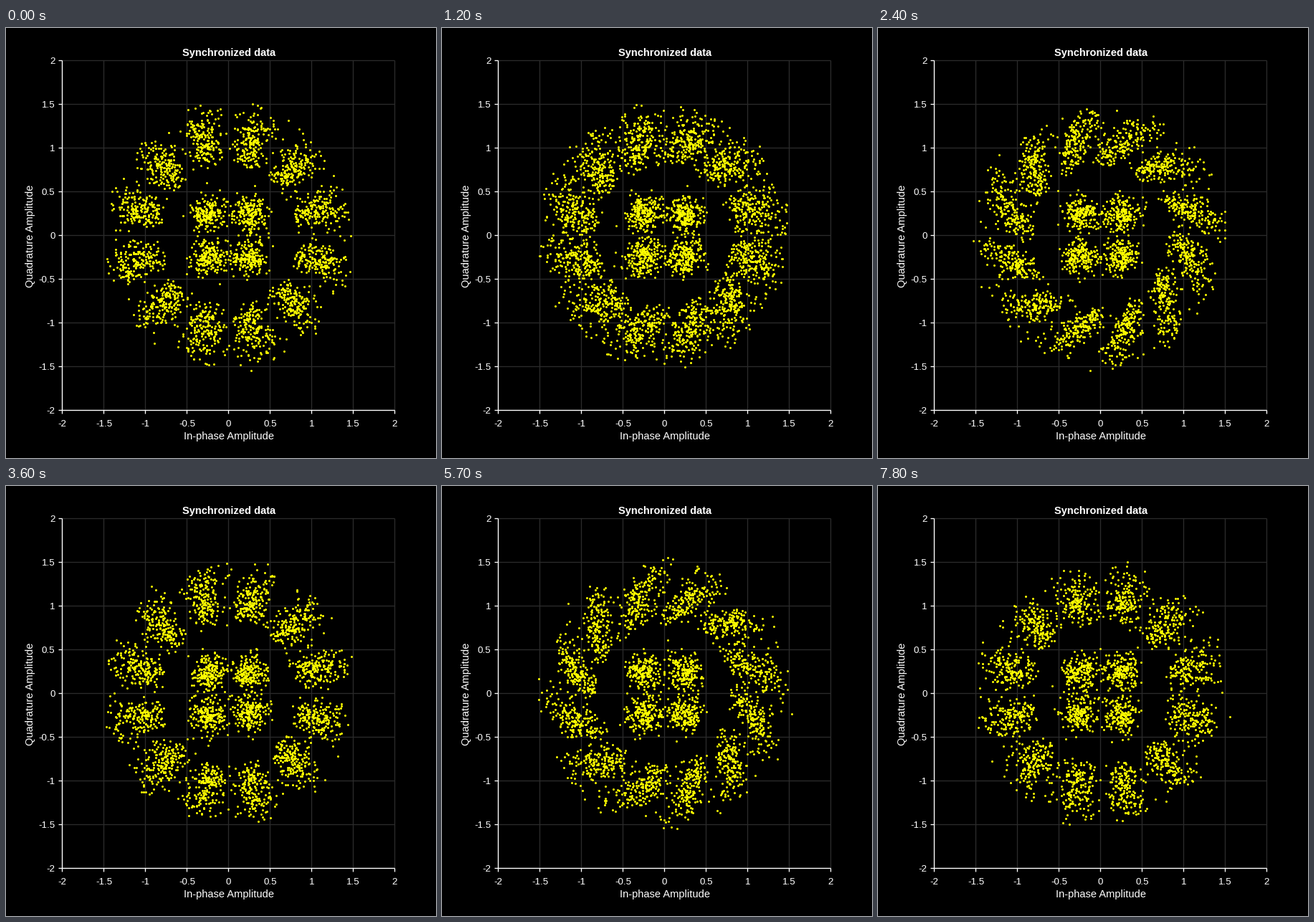
A matplotlib script that plays this animation: 600 px wide and 600 px high, repeating every 8000 ms.

```python
import numpy as np
import matplotlib.pyplot as plt
from matplotlib.animation import FuncAnimation

SIZE, DPI = 600, 96
PX = 72 / DPI  # one pixel in points
LEFT, RIGHT, TOP, BOTTOM = 78.5, 542.5, 45.5, 533.5
STEP, INTERVAL, FRAMES = 3, 100, 80  # a new burst of samples every 300 ms

# Receiver state over the bursts: phase shear with amplitude, phase jitter, samples per symbol
KEYS = [0, 4, 8, 12, 15, 19, 26]
SHEAR = [0.0, 0.4, 0.6, 0.1, 0.3, 0.6, 0.0]
JITTER = [0.1, 0.13, 0.1, 0.1, 0.115, 0.105, 0.1]
COUNT = [188, 215, 188, 188, 190, 185, 172]

plt.rcParams["font.family"] = "Liberation Sans"
fig = plt.figure(figsize=(SIZE / DPI, SIZE / DPI), dpi=DPI, facecolor="black")
ax = fig.add_axes([0, 0, 1, 1])
ax.set(xlim=(0, SIZE), ylim=(SIZE, 0))
ax.axis("off")


def to_px(x, y):
    """Map data values to stage pixels."""
    return (LEFT + (x + 2) / 4 * (RIGHT - LEFT),
            BOTTOM - (y + 2) / 4 * (BOTTOM - TOP))


def line(x, y, color="white", z=2):
    ax.plot(x, y, color=color, linewidth=1.33 * PX, solid_capstyle="butt",
            snap=False, zorder=z)


def label(x, y, text, points, **style):
    """Write white text with its baseline at (x, y)."""
    style = {"ha": "center", **style}
    ax.text(x, y, text, size=points, color="white", va="baseline",
            rotation_mode="anchor", **style)


for value in np.arange(-2, 2.1, 0.5):
    x, y = to_px(value, value)
    line([x, x], [TOP, BOTTOM], "#2b2b2b", 1)
    line([LEFT, RIGHT], [y, y], "#2b2b2b", 1)
    line([x, x], [BOTTOM, BOTTOM + 5])
    line([LEFT - 5, LEFT], [y, y])
    label(x, 556, f"{value:g}", 10)
    label(68.5, y + 4.5, f"{value:g}", 10, ha="right")
line([LEFT, LEFT, RIGHT], [TOP, BOTTOM, BOTTOM])

label(311.5, 39, "Synchronized data", 11, weight="bold")
label(311, 574, "In-phase Amplitude", 11)
label(38, 290, "Quadrature Amplitude", 11, rotation=90)

dots, = ax.plot([], [], "o", color="yellow", markersize=3 * PX,
                markeredgewidth=0, zorder=3)


def burst(index):
    """Noisy 16-APSK samples: four inner symbols and twelve on the outer ring."""
    rng = np.random.default_rng(100 + index)
    shear, jitter, count = (np.interp(index, KEYS, v) for v in (SHEAR, JITTER, COUNT))
    count = int(count)

    corners = np.exp(1j * np.pi * (np.arange(4) + 0.5) / 2) * 0.345
    inner = np.repeat(corners, count)
    noise = rng.normal(0, 0.105, (2, inner.size))
    inner = inner + noise[0] + 1j * noise[1]

    angle = np.repeat(np.pi * (np.arange(12) + 0.5) / 6, count)
    radius = 0.78 + 0.82 * rng.beta(2.2, 3, angle.size)
    angle = angle + rng.normal(0, jitter, angle.size) - shear * (radius - 1.15)
    return np.concatenate([inner, radius * np.exp(1j * angle)])


def update(frame):
    points = burst(frame // STEP)
    dots.set_data(*to_px(points.real, points.imag))
    return dots,


animation = FuncAnimation(fig, update, frames=FRAMES, interval=INTERVAL,
                          init_func=lambda: update(0), repeat=True, blit=False)
plt.show()
```
